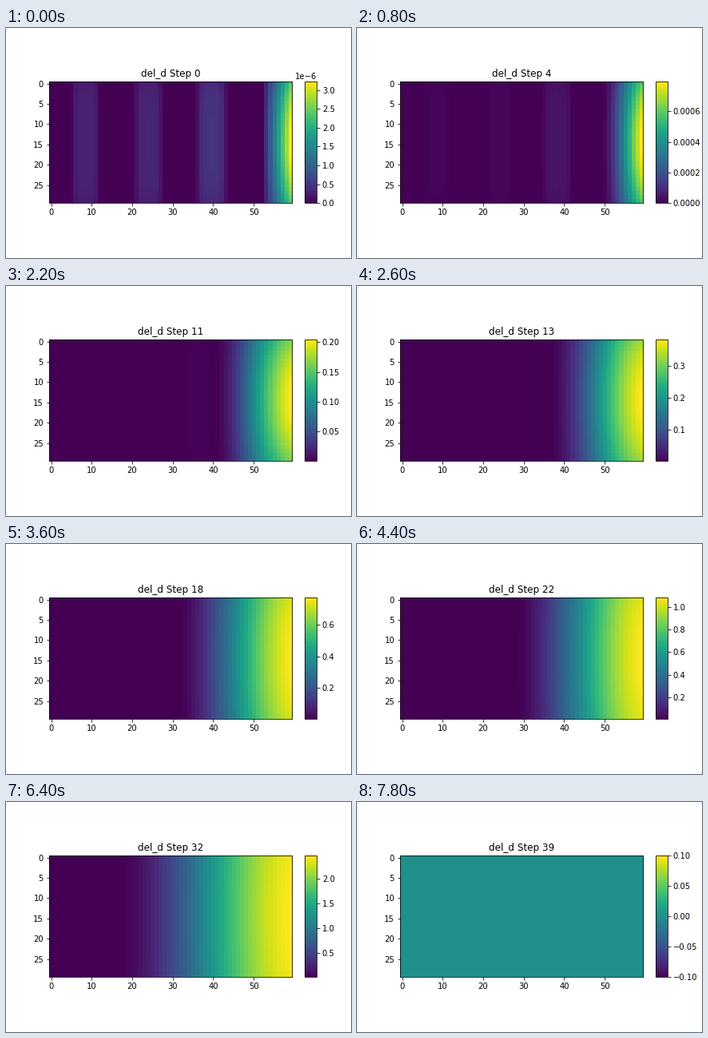
Animation, 432 px wide and 288 px high, one loop 8000 ms. Source, as a matplotlib script:

```python
import numpy as np
import matplotlib.pyplot as plt
from matplotlib.animation import FuncAnimation

W, H, DPI = 432, 288, 72
COLS, ROWS = 60, 30
STEPS, FLAT_FROM = 40, 35

col = np.arange(COLS)
row = (np.arange(ROWS) - 14.5) / 14.5

KEYS = [0, 8, 13, 18, 26, 32]
FRONT = [52, 46, 36, 30.5, 24, 16]    # where the rise begins
CREST = [62, 61, 61, 61.5, 60.5, 61.5]  # where it levels out
EDGE = [0.74, 0.72, 0.86, 0.94, 0.97, 0.98]  # strength at top and bottom

early = np.polyfit([0, 8, 13], np.log([3.22e-6, 0.0358, 0.383]), 2)
late = np.polyfit([13, 18, 26, 32], [0.383, 0.77, 1.49, 2.46], 3)


def peak(n):
    return np.exp(np.polyval(early, n)) if n <= 13 else np.polyval(late, n)


def floor(n):
    return 0.013 * (n / 32) ** 3 if n >= 10 else 0.0


def bump(center, width):
    return np.clip(1 - ((col - center) / width) ** 4, 0, 1)


def field(n):
    """Damage increment at step n, scaled to 0..1."""
    a, b, edge = (np.interp(n, KEYS, k) for k in (FRONT, CREST, EDGE))
    u = np.clip((col - a) / (b - a), 0, 1)
    smooth = u * u * (3 - 2 * u)
    smooth /= smooth[-1]
    ramp = np.clip((col - 52.3) / 6.7, 0, 1) ** 0.9
    k = min(n / 4, 1)
    rise = (1 - k) * ramp + k * smooth
    bands = (0.10 * bump(8.5, 3.6) + 0.11 * bump(24, 3.6)) * np.exp(-n / 2)
    bands = bands + 0.15 * bump(39.5 - n * 0.3, 3.8) * np.exp(-n / 4)
    sag = 1 - (1 - edge) * row ** 2
    return np.maximum(sag[:, None] * rise, (1 - 0.2 * row ** 4)[:, None] * bands)


fig = plt.figure(figsize=(W / DPI, H / DPI), dpi=DPI, facecolor="white")
full = 0.775
w = full / 1.1
h = w * W / 2 / H
bottom = 0.5025 - h / 2
ax = fig.add_axes([0.125, bottom, w, h])
cax = fig.add_axes([0.9 - 0.05 * w, bottom, 0.05 * w, h])

im = ax.imshow(np.zeros((ROWS, COLS)), cmap="viridis", vmin=0, vmax=peak(0),
               interpolation="nearest", aspect="auto")
ax.set_xticks(range(0, 60, 10))
ax.set_yticks(range(0, 30, 5))
title = ax.set_title("")
fig.colorbar(im, cax=cax)


def draw(n):
    if n < FLAT_FROM:
        lo, hi = floor(n), peak(n)
        im.set_data(lo + (hi - lo) * field(n))
        im.set_clim(lo, hi)
    else:
        im.set_data(np.zeros((ROWS, COLS)))
        im.set_clim(-0.1, 0.1)
    title.set_text(f"del_d Step {n}")
    return im, title


anim = FuncAnimation(fig, draw, frames=STEPS, interval=200, repeat=True,
                     repeat_delay=0, blit=False)
plt.show()
```
